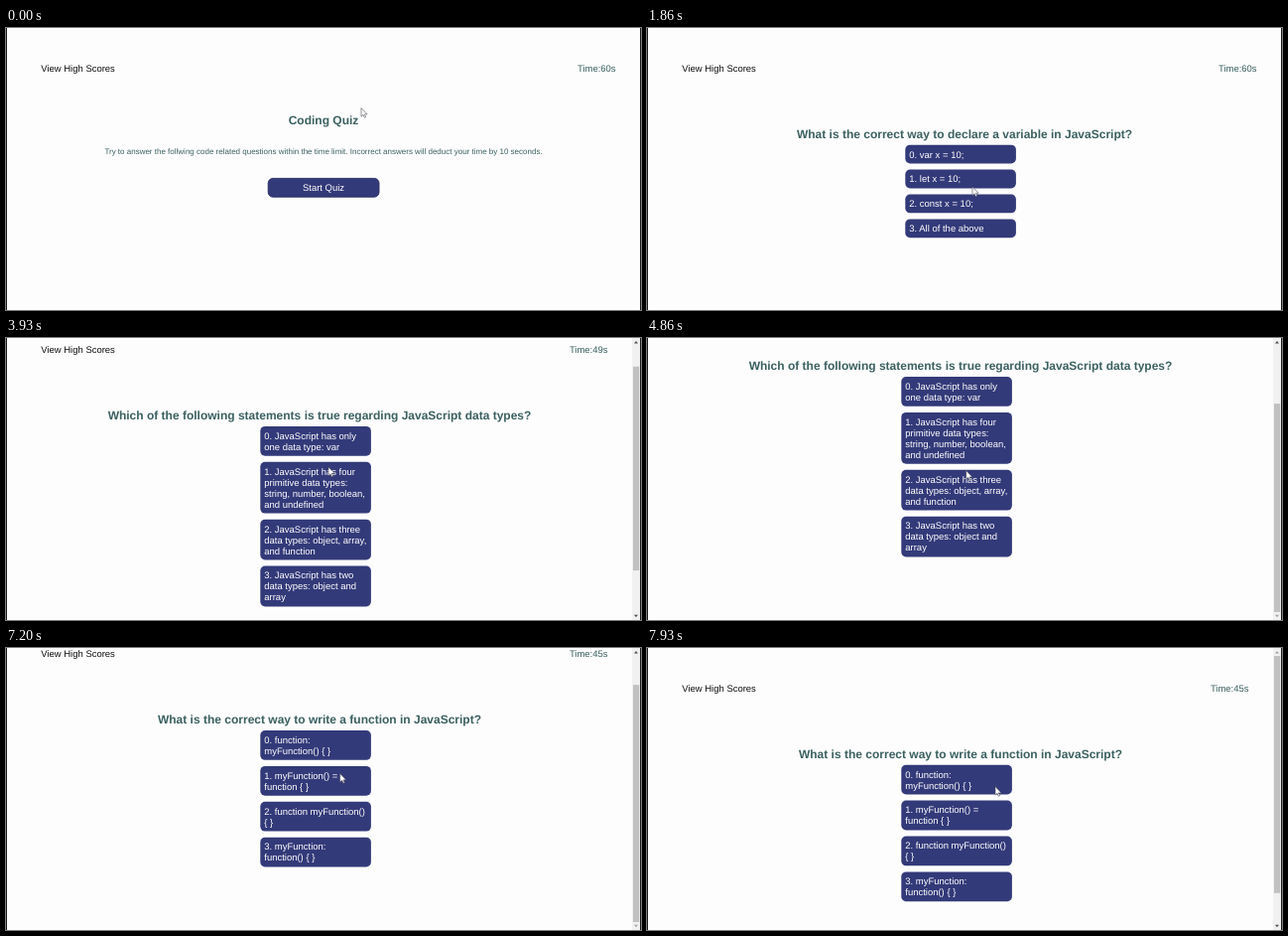
Recreate the animation shown at these times as an HTML page. Size 640 by 284 pixels, loop 8000 ms.

```html
<!DOCTYPE html>
<html lang="en">
<head>
<meta charset="utf-8">
<title>Coding Quiz</title>
<style>
  html, body { margin: 0; width: 100%; height: 100%; overflow: hidden; background: #fdfdfd; }
  svg { display: block; width: 640px; height: 284px; }
  text {
    font-family: "Liberation Sans", Arial, sans-serif;
    font-size: 9.47px;
    fill: #3b6060;
    text-rendering: geometricPrecision;
    white-space: pre;
  }
  .head { font-size: 12px; font-weight: bold; text-anchor: middle; }
  .small { font-size: 8px; text-anchor: middle; }
  .link { fill: #111; }
  .light { fill: #fff; }
  .box { fill: #333a79; }
</style>
</head>
<body>
<svg id="stage" viewBox="0 0 640 284">
  <rect width="640" height="284" fill="#fdfdfd"/>
  <g id="page">
    <text class="link" x="35.3" y="43.8">View High Scores</text>
    <text id="clock" y="43.8" text-anchor="end"></text>
    <g id="intro">
      <text class="head" x="320" y="96.7">Coding Quiz</text>
      <text class="small" x="320" y="127.2">Try to answer the follwing code related questions within the time limit. Incorrect answers will deduct your time by 10 seconds.</text>
      <rect class="box" x="264.2" y="151.4" width="111.8" height="18.8" rx="4.8" stroke="#262c60" stroke-width="0.9"/>
      <text class="light" x="320" y="164" text-anchor="middle">Start Quiz</text>
    </g>
    <g id="quiz"></g>
    <text id="verdict" class="small" x="316"></text>
  </g>
  <g id="bar">
    <rect x="631" width="8" height="284" fill="#f1f1f1"/>
    <rect id="thumb" x="632" width="6.2" fill="#c1c1c1"/>
    <path id="up" d="M633 5.4h4l-2-2.4z"/>
    <path id="down" d="M633 278.8h4l-2 2.4z"/>
  </g>
  <path d="M.5 0V284M639.5 0V284" stroke="#1c1c1c"/>
  <path id="mouse" d="M0 0V8.6L2 6.8 3.3 9.7 4.6 9.1 3.4 6.3H6.1z" fill="#fff" stroke="#4a4a55" stroke-width="0.6"/>
</svg>
<script>
const LOOP = 8000, STEP = 1000 / 15, VIEW = 284;
const LINE = 11, PAD = 7.8, GAP = 6.1, TOP = 117.7;
const $ = id => document.getElementById(id);

const questions = [
  { at: 1860, mid: 320,
    title: "What is the correct way to declare a variable in JavaScript?",
    options: ["0. var x = 10;", "1. let x = 10;", "2. const x = 10;", "3. All of the above"] },
  { at: 3195, mid: 316, verdict: "Incorrect!",
    title: "Which of the following statements is true regarding JavaScript data types?",
    options: [
      "0. JavaScript has only|one data type: var",
      "1. JavaScript has four|primitive data types:|string, number, boolean,|and undefined",
      "2. JavaScript has three|data types: object, array,|and function",
      "3. JavaScript has two|data types: object and|array"] },
  { at: 5730, mid: 316, verdict: "Correct!",
    title: "What is the correct way to write a function in JavaScript?",
    options: [
      "0. function:|myFunction() { }",
      "1. myFunction() =|function { }",
      "2. function myFunction()|{ }",
      "3. myFunction:|function() { }"] }
];

// Each glide eases the pointer to a new resting place.
const glides = [
  { from: 800, to: 1600, x: 328, y: 160 },
  { from: 2233, to: 3066, x: 325, y: 130 },
  { from: 4266, to: 4533, x: 321.7, y: 133.6 },
  { from: 4867, to: 5660, x: 326, y: 112 },
  { from: 6133, to: 6467, x: 330, y: 124 },
  { from: 6733, to: 7533, x: 340.7, y: 128 },
  { from: 7533, to: 7920, x: 351, y: 139.6 }
];

function ease(t, from, to) {
  const u = Math.min(1, Math.max(0, (t - from) / (to - from)));
  return u * u * (3 - 2 * u);
}

function pointer(t) {
  let x = 358, y = 80.6;
  for (const g of glides) {
    const k = ease(t, g.from, g.to);
    x += (g.x - x) * k;
    y += (g.y - y) * k;
  }
  return `translate(${x} ${y})`;
}

// One wheel turn down past the end, later one back to the top.
const wheel = t => 87 * ease(t, 3733, 4253) - (t > 7500 ? 52 + 35 * ease(t, 7533, 7920) : 0);

// Counts whole seconds; the wrong answer costs ten more.
const secondsLeft = t => 60 - Math.max(0, Math.floor((t - 1995) / 1000)) - (t >= 3195 ? 10 : 0);

function build(q) {
  const x = q.mid - 59.7;
  let y = TOP, out = `<text class="head" x="${q.mid}" y="111.1">${q.title}</text>`;
  for (const option of q.options) {
    const lines = option.split("|"), h = lines.length * LINE + PAD;
    out += `<rect class="box" x="${x}" y="${y}" width="111.6" height="${h}" rx="4.8"/>`;
    lines.forEach((s, i) => {
      out += `<text class="light" x="${x + 4}" y="${y + 12.8 + i * LINE}">${s}</text>`;
    });
    y += h + GAP;
  }
  q.bottom = y - GAP;
  q.node = document.createElementNS("http://www.w3.org/2000/svg", "g");
  q.node.innerHTML = out;
  $("quiz").append(q.node);
}
questions.forEach(build);

const show = (el, on) => el.setAttribute("display", on ? "inline" : "none");
const set = (el, attrs) => { for (const k in attrs) el.setAttribute(k, attrs[k]); };

function draw(t) {
  const q = questions.filter(o => t >= o.at).pop();
  show($("intro"), !q);
  questions.forEach(o => show(o.node, o === q));

  const judged = q && q.verdict && t < q.at + 1000;
  show($("verdict"), judged);
  if (judged) {
    $("verdict").textContent = q.verdict;
    set($("verdict"), { y: q.bottom + 25.5 });
  }

  const height = q ? Math.max(VIEW, q.bottom + (judged ? 71.5 : 63.5)) : VIEW;
  const long = q && q.verdict;
  const max = long ? height - VIEW : 0;
  const top = Math.min(wheel(t), max);
  set($("page"), { transform: `translate(0 ${-top})` });

  show($("bar"), long);
  const track = VIEW - 16;
  set($("thumb"), { y: 8 + track * top / height, height: track * VIEW / height });
  set($("up"), { fill: top > 0 ? "#505050" : "#a3a3a3" });
  set($("down"), { fill: top < max ? "#505050" : "#a3a3a3" });

  $("clock").textContent = `Time:${secondsLeft(t)}s`;
  set($("clock"), { x: long ? 606.5 : 614.6 });
  set($("mouse"), { transform: pointer(t) });
}

const start = performance.now();
function tick() {
  const t = (performance.now() - start) % LOOP;
  draw(Math.floor((t + 7) / STEP) * STEP);
  requestAnimationFrame(tick);
}
tick();
</script>
</body>
</html>
```
